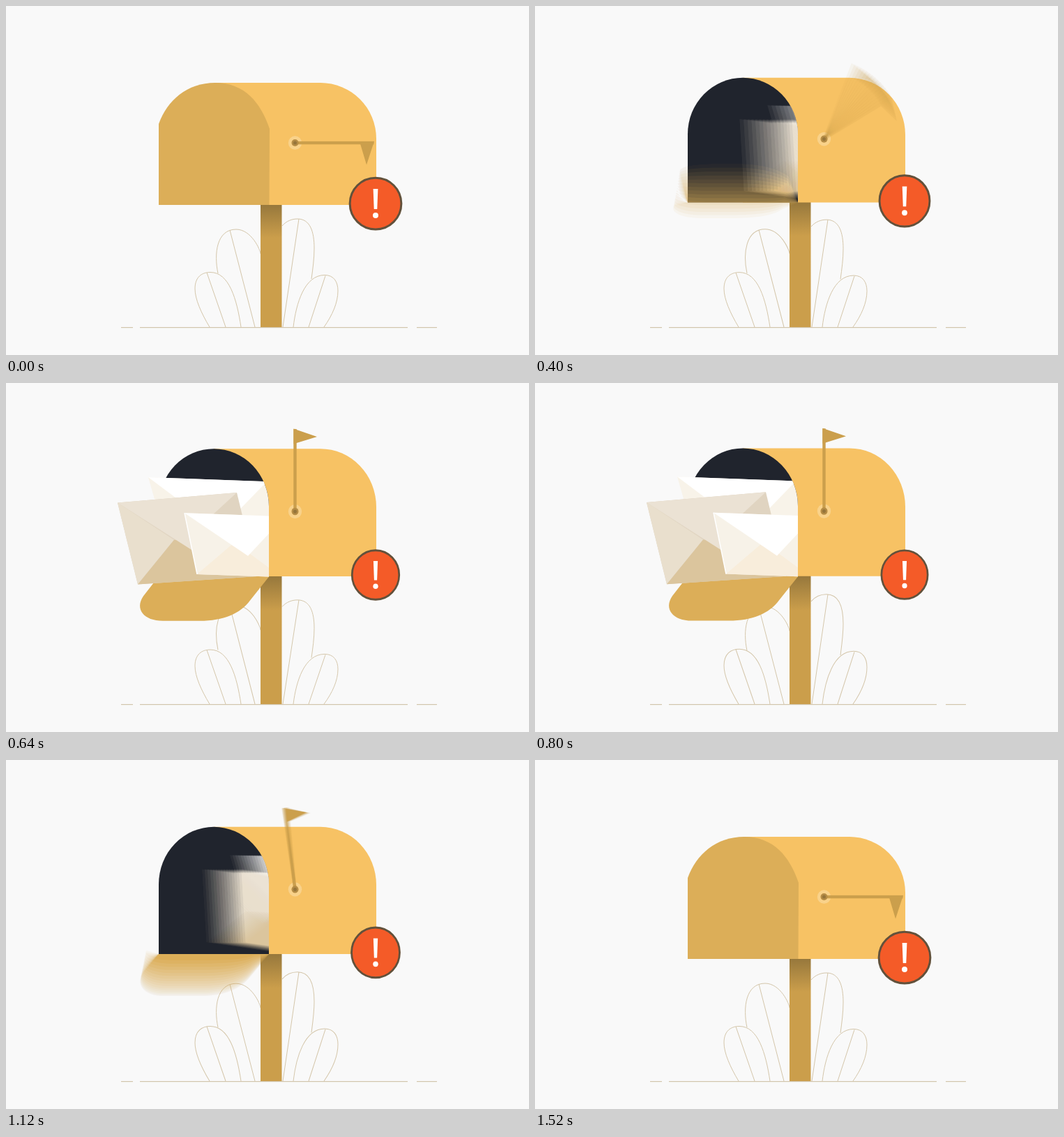
An HTML page with a canvas for the animation above (1.56 s loop, 750 by 500 pixels).

```html
<!DOCTYPE html>
<html lang="en">
<head>
<meta charset="utf-8">
<title>Mailbox</title>
<style>
html, body { margin: 0; width: 100%; height: 100%; overflow: hidden; background: #f9f9f9; }
canvas { display: block; width: 750px; height: 500px; }
</style>
</head>
<body>
<canvas id="stage" width="750" height="500"></canvas>
<script>
const LOOP = 1560, STEP = 40, SAMPLES = 16, SHUTTER = 40, GROUND = 460;
const BEAT = (LOOP - STEP) / 3, SWAY = (LOOP - STEP) / 2;

const body = new Path2D("M298 110H451A80 80 0 0 1 531 190V285H298Z");
const arch = new Path2D("M219 285V189A79 79 0 0 1 377 189V285Z");
const mouth = new Path2D("M-10 -10H298V110A79 79 0 0 1 377 189V500H-10Z");
const closed = [219, 285, 219, 169, 231, 135, 260, 110, 300, 110, 300, 110, 342, 110, 365, 138, 378, 176, 377.5, 285];
const opened = [219, 285, 197, 312, 184, 330, 198, 346, 225, 346, 278, 346, 312, 346, 336, 336, 350, 318, 377.5, 285];

const bush = (top, sway, d) => ({ top, sway, path: new Path2D(d) });
const bushes = [
  bush(320, 1.5, "M304 383C298 355 302 320 330 320C352 320 365 350 365 355M321 321L357 460"),
  bush(381.5, -.7, "M292 460C280 440 271 420 271 405C271 388 281 381.5 293 381.5C320 381.5 331 420 337 460M288 382L315 460"),
  bush(305, -7, "M396 315C402 308 410 305 418 305C436 305 442 323 442 347C442 362 440 376 438 391M420 305L397 460"),
  bush(385.5, -3.5, "M412 460C416 426 428 385.5 457 385.5C470 385.5 476 395 476 408C476 425 468 443 456 460M458 386.5L434 460")
];

const out = document.getElementById("stage").getContext("2d");
const layer = document.createElement("canvas");
layer.width = 750;
layer.height = 500;
const c = layer.getContext("2d");

const shade = c.createLinearGradient(0, 285, 0, 332);
shade.addColorStop(0, "#97783c");
shade.addColorStop(1, "#cb9e4b");

// Eased step from 0 to 1 between two times.
function ramp(t, from, to) {
  const x = Math.min(1, Math.max(0, (t - from) / (to - from)));
  return x * x * (3 - 2 * x);
}

const doorOpen = t => ramp(t, 300, 460) - ramp(t, 1090, 1250);
const mailIn = t => 1 - ramp(t, 350, 500) + ramp(t, 990, 1210);
const flagTurn = t => 90 - 90 * ramp(t, 330, 460) - 9 * ramp(t, 1040, 1150) + 99 * ramp(t, 1160, 1290);
const pulse = t => Math.sin(Math.PI * (t + 27) / BEAT) ** 2;
const bodyTop = t => 111.3 - 18 * (1 - (1 - pulse(t)) ** 2.5);

function group(draw) {
  c.save();
  draw();
  c.restore();
}

// Draws with heights scaled about the ground line.
function stretch(k, draw) {
  group(() => {
    c.translate(0, GROUND);
    c.scale(1, k);
    c.translate(0, -GROUND);
    draw();
  });
}

function poly(color, ...p) {
  c.beginPath();
  for (let i = 0; i < p.length; i += 2) c.lineTo(p[i], p[i + 1]);
  c.closePath();
  c.fillStyle = color;
  c.fill();
}

function disc(color, x, y, r) {
  c.beginPath();
  c.arc(x, y, r, 0, Math.PI * 2);
  c.fillStyle = color;
  c.fill();
}

function drawPlants(t) {
  c.strokeStyle = "#d4c6aa";
  c.lineWidth = 1;
  const wave = Math.sin(Math.PI * 2 * t / SWAY);
  for (const b of bushes) {
    stretch(1 - b.sway * wave / (GROUND - b.top), () => c.stroke(b.path));
  }
  c.fillStyle = "#d2c5ac";
  for (const [x, w] of [[165, 17], [192, 384], [589, 29]]) c.fillRect(x, 460, w, 1.2);
}

function drawDoor(k) {
  const p = closed.map((v, i) => v + (opened[i] - v) * k);
  c.beginPath();
  c.moveTo(p[0], p[1]);
  c.lineTo(p[2], p[3]);
  c.bezierCurveTo(...p.slice(4, 10));
  c.lineTo(p[10], p[11]);
  c.bezierCurveTo(...p.slice(12, 18));
  c.lineTo(p[18], p[19]);
  c.closePath();
  c.fillStyle = "#dcae58";
  c.fill();
}

function drawMail(inside) {
  const k = Math.min(1, inside * 2);
  c.clip(mouth);
  c.translate(230 * inside, 0);

  poly("#f8f3e9", 204, 149, 376, 155, 404, 262, 237, 259);
  poly("#ffffff", 204, 149, 306, 222, 374, 155);

  group(() => {
    c.translate(260 - 16 * k, 233 - 5 * k);
    c.rotate(.2 * k);
    c.scale(1 - .1 * k, 1 - .13 * k);
    c.translate(-260, -233);
    poly("#e0d4c1", 160, 184, 331, 170, 360, 285, 189, 296);
    poly("#e9dfcd", 160, 184, 241, 235, 189, 296);
    poly("#dbc59d", 189, 296, 241, 235, 285, 235, 360, 285);
    poly("#ebe2d4", 160, 184, 270, 251, 298, 199, 331, 170);
  });

  poly("#f7f2e8", 256, 198, 405, 203, 425, 287, 274, 282);
  poly("#f8eddb", 274, 282, 323, 242, 347, 252, 395, 286);
  poly("#ffffff", 256, 198, 347, 257, 400, 203);
  c.strokeStyle = "#ffffff";
  c.lineWidth = 1.5;
  c.beginPath();
  c.moveTo(256, 198);
  c.lineTo(274, 282);
  c.stroke();
}

function drawFlag(deg) {
  disc("#f9d28a", 414.5, 196, 9.7);
  group(() => {
    c.translate(414.5, 196);
    c.rotate(deg * Math.PI / 180);
    c.fillStyle = "#cb9f4c";
    c.fillRect(-2.2, -113, 4.4, 113);
    poly("#cb9f4c", -2, -113.5, 31.5, -102.5, -2, -92.5);
  });
  disc("#b58c45", 414.5, 196, 5);
  disc("#96753a", 414.5, 196, 2.5);
}

function drawBadge(s) {
  c.translate(530, 283);
  c.scale(s, s);
  disc("#f45b28", 0, 0, 37);
  c.strokeStyle = "#62513b";
  c.lineWidth = 3;
  c.stroke();
  poly("#ffffff", -3.4, -21, 3.4, -21, 2.3, 8, -2.3, 8);
  disc("#ffffff", 0, 17, 4);
}

// The body follows the frame time; only the quick parts are blurred.
function scene(t, quick) {
  const door = doorOpen(quick);
  c.fillStyle = "#f9f9f9";
  c.fillRect(0, 0, 750, 500);
  drawPlants(t);
  stretch((GROUND - bodyTop(t)) / 350, () => {
    c.fillStyle = shade;
    c.fillRect(365, 284, 30.5, 176);
    c.fillStyle = "#f7c264";
    c.fill(body);
    if (door > 0) {
      c.fillStyle = "#20242d";
      c.fill(arch);
    }
    // a lowered door hangs behind the letters
    if (door > .5) drawDoor(door);
    group(() => drawMail(mailIn(quick)));
    if (door <= .5) drawDoor(door);
    drawFlag(flagTurn(quick));
    group(() => drawBadge(1 - .125 * pulse(t)));
  });
}

// Averages several moments inside the shutter for motion blur.
function render(t) {
  for (let i = 0; i < SAMPLES; i++) {
    scene(t, t + ((i + .5) / SAMPLES - .5) * SHUTTER);
    out.globalAlpha = 1 / (i + 1);
    out.drawImage(layer, 0, 0);
  }
}

const start = performance.now();
let shown = -1;
function tick() {
  const t = (performance.now() - start) % LOOP;
  const frame = Math.floor(t / STEP) * STEP;
  if (frame !== shown) render(shown = frame);
  requestAnimationFrame(tick);
}
tick();
</script>
</body>
</html>
```
